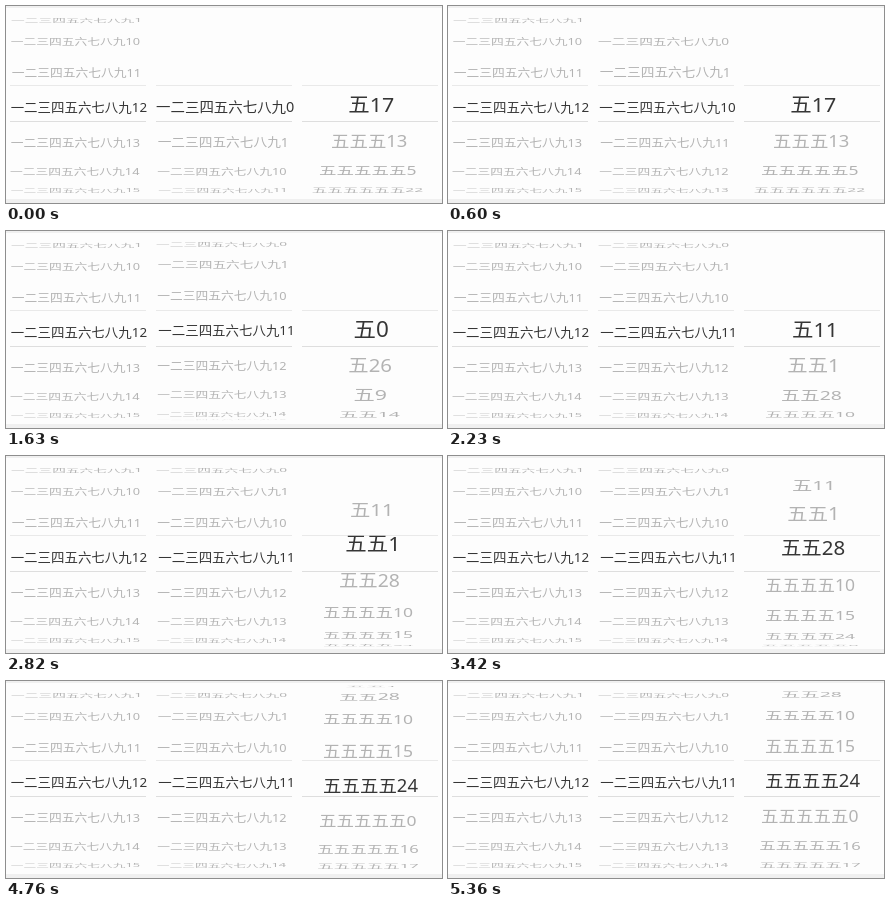
An HTML page with a canvas for the animation above (6410 ms loop, 436x197 px).

```html
<!DOCTYPE html>
<html lang="zh-CN">
<head>
<meta charset="utf-8">
<title>Linked wheel picker</title>
<style>
  html, body { margin: 0; width: 100%; height: 100%; overflow: hidden; background: #fdfdfd; }
  canvas { display: block; width: 436px; height: 197px; }
</style>
</head>
<body>
<canvas id="stage"></canvas>
<script>
const W = 436, H = 197, LOOP = 6410;
const STEP = 148.9, LAST = 36;          // the picture advances in equal steps, then rests
const MID = 97.4, ROW = 36, RADIUS = ROW * 8 / Math.PI;
const TOP = MID - ROW / 2, BOTTOM = MID + ROW / 2;
const WIDEN = 1.055;                    // selected text is slightly wider
const INK = '#363636', FADED = '#b3b3b3';
const FAMILY = '"Noto Sans", "Noto Sans CJK SC", "Noto Sans CJK JP", sans-serif';

const canvas = document.getElementById('stage');
const ctx = canvas.getContext('2d');
const dpr = window.devicePixelRatio || 1;
canvas.width = W * dpr;
canvas.height = H * dpr;

// numbers in alphabetical order: 0, 1, 10, 11, ...
const numbered = Array.from({ length: 18 }, (_, n) => String(n))
  .filter(s => s[0] < '2').sort().map(s => '一二三四五六七八九' + s);
const details = [
  '五17 五五五13 五五五五五5 五五五五五五22',
  '五0 五26 五9 五五14',
  '五11 五五1 五五28 五五五五10 五五五五15 五五五五24 五五五五五0 五五五五五16 五五五五五17 五五五五五五20'
].map(list => list.split(' '));

// Key points [time, row]: fling, drag, overshoot, settle
const middleMoves = [[0, 0], [600, 2], [800, 2], [1340, 3.25], [1780, 3]];
const rightMoves = [[2380, 0], [3120, 2], [3310, 2.08], [4100, 4.06], [4400, 4], [4980, 5.25], [5360, 5]];

function along(moves, t) {
  const next = moves.findIndex(([time]) => time > t);
  if (next < 0) return moves[moves.length - 1][1];
  if (next === 0) return moves[0][1];
  const [t0, p0] = moves[next - 1], [t1, p1] = moves[next];
  const u = (t - t0) / (t1 - t0);
  return p0 + (p1 - p0) * u * u * (3 - 2 * u);
}

function drawText(text, x, y, sx, sy, color, top, bottom) {
  ctx.save();
  ctx.beginPath();
  ctx.rect(0, top, W, bottom - top);
  ctx.clip();
  ctx.translate(x, y);
  ctx.scale(sx, sy);
  ctx.fillStyle = color;
  ctx.fillText(text, 0, 0);
  ctx.restore();
}

function drawWheel(items, pos, center) {
  items.forEach((text, i) => {
    const angle = (i - pos) * ROW / RADIUS;
    if (Math.abs(angle) > 1.56) return;
    const squash = Math.cos(angle);
    const y = MID + RADIUS * Math.sin(angle);
    ctx.font = `${23.2 - .95 * text.length}px ${FAMILY}`;
    const box = ctx.measureText(text);
    const inkWidth = box.actualBoundingBoxLeft + box.actualBoundingBoxRight;
    const x = center - inkWidth * WIDEN / 2;
    const outer = (top, bottom) =>
      drawText(text, x, y + 9.2 * squash, 1, squash * .96, FADED, top, bottom);

    outer(0, TOP);
    outer(BOTTOM, H);
    drawText(text, x, y + 8.9 * squash, WIDEN, squash, INK, TOP, BOTTOM);
  });
}

function drawFrame() {
  ctx.fillStyle = '#fdfdfd';
  ctx.fillRect(0, 0, W, H);
  ctx.fillStyle = '#f0f0f0';
  ctx.fillRect(0, 0, W, 2);
  ctx.fillRect(0, 193, W, 4);
  for (const x of [4, 150, 296]) {
    ctx.fillStyle = '#e9e9e9';
    ctx.fillRect(x, 79, 136, 1);
    ctx.fillStyle = '#dedede';
    ctx.fillRect(x, 115, 136, 1);
  }
}

function render(now) {
  const t = Math.min(LAST, Math.floor((now % LOOP + 10) / STEP)) * STEP;
  ctx.setTransform(dpr, 0, 0, dpr, 0, 0);
  drawFrame();
  drawWheel(numbered, 4, 72.7);
  drawWheel(numbered, along(middleMoves, t), 219.3);
  drawWheel(details[t < 740 ? 0 : t < 1930 ? 1 : 2], along(rightMoves, t), 364.5);
}

const start = performance.now();
function tick() {
  render(performance.now() - start);
  requestAnimationFrame(tick);
}
tick();
</script>
</body>
</html>
```
